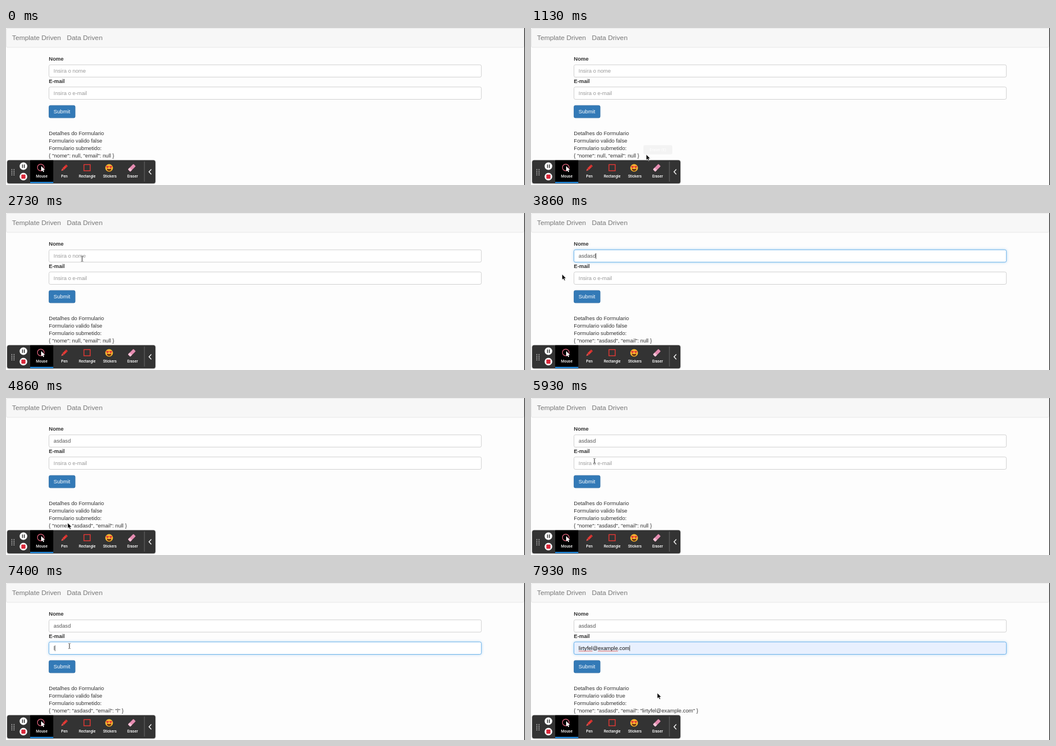
Animation of 900 by 274 pixels, one loop 8000 ms. Source, as an HTML page:

```html
<!DOCTYPE html>
<html lang="pt">
<head>
<meta charset="utf-8">
<title>Formulario</title>
<style>
html, body { margin: 0; width: 100%; height: 100%; overflow: hidden; background: #fdfdfd; }
svg { display: block; width: 100%; height: 100%; }
text { font: 9.21px "Liberation Sans", Arial, sans-serif; fill: #333; white-space: pre; }
.brand { font-size: 11.75px; fill: #777; }
.label { font-weight: bold; }
.field { fill: #fff; stroke: #ccc; stroke-width: .9; }
.tool { font: 500 6.5px Roboto, sans-serif; fill: #fff; text-anchor: middle; }
.caret { stroke: #333; stroke-width: .8; }
</style>
</head>
<body>
<svg viewBox="0 0 900 274">
  <rect width="900" height="274" fill="#fdfdfd"/>
  <rect x=".4" y=".4" width="898" height="33.4" rx="2.6" fill="#f7f7f7" stroke="#e4e4e4" stroke-width=".8"/>
  <rect x="898.8" width="1.2" height="274" fill="#222"/>
  <text class="brand" x="10.5" y="21">Template Driven</text>
  <text class="brand" x="105.4" y="21">Data Driven</text>

  <text class="label" x="74.3" y="57.2">Nome</text>
  <text class="label" x="74.3" y="96">E-mail</text>
  <g id="name">
    <rect class="glow" x="74.5" y="64.2" width="749.8" height="21.6" rx="2.6"/>
    <rect class="field" x="74.5" y="64.2" width="749.8" height="21.6" rx="2.6"/>
    <text x="82.6" y="78.2"></text>
    <path class="caret"/>
  </g>
  <g id="mail">
    <rect class="glow" x="74.5" y="102.9" width="749.8" height="21.6" rx="2.6"/>
    <rect class="field" x="74.5" y="102.9" width="749.8" height="21.6" rx="2.6"/>
    <text x="82.6" y="116.9"></text>
    <path class="caret"/>
  </g>
  <path id="spell" stroke="#e2574c" stroke-width=".9"/>
  <rect x="74.5" y="135.2" width="45.4" height="21.6" rx="2.6" fill="#337ab7" stroke="#2e6da4" stroke-width=".8"/>
  <text x="82.6" y="149.3" style="fill:#fff">Submit</text>

  <text x="74.3" y="186.7">Detalhes do Formulario</text>
  <text id="valid" x="74.3" y="199.8"></text>
  <text x="74.3" y="212.9">Formulario submetido:</text>
  <text id="json" x="74.3" y="226"></text>

  <g id="tip" opacity="0">
    <rect x="195" y="204.5" width="50" height="16" rx="2" fill="#555"/>
    <text class="tool" x="220" y="215">Eraser (E)</text>
  </g>

  <rect x="1" y="230" width="259" height="42.5" rx="4.5" fill="#000" opacity=".18"/>
  <rect x="2" y="230.8" width="257" height="40.4" rx="3.5" fill="#333"/>
  <g id="grip" fill="#ddd"></g>
  <circle cx="30.2" cy="241.2" r="6.6" fill="#fff"/>
  <path d="M28.6 238.2v6M31.8 238.2v6" stroke="#333" stroke-width="1.5"/>
  <circle cx="30.2" cy="259.4" r="6.6" fill="#fff"/>
  <rect x="26.6" y="255.8" width="7.2" height="7.2" rx="1.2" fill="#d9283a"/>

  <rect x="42" y="230.8" width="40" height="40.4" fill="#000"/>
  <rect x="42" y="268.6" width="40" height="2.2" fill="#2b9af3"/>
  <circle cx="60.3" cy="243.4" r="5.8" fill="none" stroke="#e0647c" stroke-width="1.2"/>
  <path d="M61 241v9.2l2.1-1.9 1.5 3.2 1.6-.8-1.5-3h2.9z" fill="#fff"/>

  <g transform="translate(101.3 244) rotate(45)">
    <path d="M-2-6.2h4v9.2h-4z" fill="#e53935"/>
    <path d="M-2 3.6h4l-2 4.2z" fill="#ef5350"/>
    <path d="M-2-4.2h4" stroke="#8e1c1c" stroke-width=".8"/>
  </g>
  <rect x="135.2" y="238.4" width="10.8" height="10.8" fill="none" stroke="#e53935" stroke-width="1.4"/>

  <circle cx="178.8" cy="244.2" r="6.6" fill="#f9b82f"/>
  <path d="M174.8 245.6q4 1.2 8 0q-.5 4-4 4t-4-4z" fill="#6b3212"/>
  <path id="hearts" fill="#e53935"/>

  <g transform="translate(218.2 244) rotate(45)">
    <rect x="-2.9" y="-6.8" width="5.8" height="13.6" rx="1.2" fill="#e58bb0"/>
    <path d="M-2.9 2.4h5.8v3.2q0 1.2-1.2 1.2h-3.4q-1.2 0-1.2-1.2z" fill="#f6c3d7"/>
  </g>
  <g id="tools"></g>
  <path d="M240 233v35" stroke="#777" stroke-width=".8"/>
  <path d="M252 246.6l-4 4.4 4 4.4" fill="none" stroke="#fff" stroke-width="1.4"/>

  <path id="arrow" d="M0 0v9.6l2.2-2 1.6 3.5 1.7-.8-1.6-3.3h3z" fill="#000" stroke="#fff" stroke-width=".6"/>
  <path id="beam" d="M-2-4.6q2 0 2 1.2v6.8q0 1.2-2 1.2M2-4.6q-2 0-2 1.2v6.8q0 1.2 2 1.2" fill="none" stroke="#555" stroke-width=".8"/>
</svg>
<script>
const LOOP = 8000;
const NAME = 'asdasd', MAIL = 'lirtyfel@example.com';
const KEYS = [3130, 3200, 3260, 3460, 3530, 3600];
const FILL = 7530;
// pointer stops: time, x, y
const PATH = [
  [930, 216, 248], [1130, 200, 221], [1460, 172, 172], [1660, 172, 172],
  [2460, 132, 80], [3460, 132, 80], [3860, 54, 107], [4260, 26, 111],
  [4600, 26, 111], [4860, 107, 218], [5130, 107, 218], [5930, 110, 110],
  [7530, 110, 110], [7930, 219, 192]
];

const $ = id => document.getElementById(id);
const clamp = v => Math.max(0, Math.min(1, v));
const ramp = (t, a, b) => clamp((t - a) / (b - a));
const show = (el, on) => el.setAttribute('visibility', on ? 'visible' : 'hidden');

function fieldParts(id) {
  const [glow, box, text, caret] = $(id).children;
  return { glow, box, text, caret };
}
const nameField = fieldParts('name'), mailField = fieldParts('mail');
for (const f of [nameField, mailField]) {
  f.glow.setAttribute('style', 'fill:#66afe9;filter:drop-shadow(0 0 2.4px #66afe9)');
}

$('tools').innerHTML = [['Mouse', 62], ['Pen', 101.2], ['Rectangle', 140.7], ['Stickers', 180], ['Eraser', 219.5]]
  .map(([s, x]) => `<text class="tool" x="${x}" y="261.3">${s}</text>`).join('');
$('grip').innerHTML = Array.from({ length: 8 }, (_, i) =>
  `<circle cx="${10.2 + i % 2 * 3.7}" cy="${247 + (i >> 1) * 3.1}" r=".85"/>`).join('');
$('hearts').setAttribute('d', [176, 181.6].map(x =>
  `M${x} 245l-2.3-2.4q-.5-2 1.2-2 .8 0 1.1.8.3-.8 1.1-.8 1.7 0 1.2 2z`).join(''));

function pointer(t) {
  let i = PATH.findIndex(p => p[0] > t);
  if (i < 0) return PATH[PATH.length - 1].slice(1);
  if (i === 0) return PATH[0].slice(1);
  const [t0, x0, y0] = PATH[i - 1], [t1, x1, y1] = PATH[i];
  const k = (t - t0) / (t1 - t0);
  return [x0 + (x1 - x0) * k, y0 + (y1 - y0) * k];
}

function drawField(f, value, hint, focus, caretOn, filled) {
  f.glow.setAttribute('opacity', focus * .65);
  f.box.style.stroke = focus > .5 ? '#66afe9' : '#ccc';
  f.box.style.fill = filled ? '#e8f0fe' : '#fff';
  f.text.textContent = value || hint;
  f.text.style.fill = filled ? '#111' : value ? '#555' : '#999';
  const x = 83 + (value ? f.text.getComputedTextLength() : 0);
  const y = f.text.getAttribute('y') - 8;
  f.caret.setAttribute('d', `M${x} ${y}v10`);
  show(f.caret, caretOn);
}

function draw(t) {
  const name = NAME.slice(0, KEYS.filter(k => t >= k).length);
  const filled = t >= FILL;
  const mail = filled ? MAIL : t >= 7130 ? MAIL[0] : '';
  const nameFocus = ramp(t, 2790, 2930) * (1 - ramp(t, 4330, 4460));
  const mailFocus = t >= 6800 ? 1 : 0;

  drawField(nameField, name, 'Insira o nome', nameFocus, t >= 2860 && t < 4330, false);
  drawField(mailField, mail, 'Insira o e-mail', mailFocus, mailFocus, filled);

  const at = MAIL.indexOf('@');
  const len = n => 82.6 + mailField.text.getSubStringLength(0, n);
  $('spell').setAttribute('d', filled
    ? `M82.6 118.9H${len(at)}M${len(at + 1)} 118.9H${len(MAIL.indexOf('.'))}` : '');

  const quote = s => s ? `"${s}"` : 'null';
  $('valid').textContent = `Formulario valido ${filled}`;
  $('json').textContent = `{ "nome": ${quote(name)}, "email": ${quote(mail)} }`;

  $('tip').setAttribute('opacity', .85 * ramp(t, 860, 930) * (1 - ramp(t, 1000, 1140)));

  const [x, y] = pointer(t);
  const inField = x > 74 && x < 825 && (y > 64 && y < 86 || y > 103 && y < 125);
  const pos = `translate(${x} ${y})`;
  $('arrow').setAttribute('transform', pos);
  $('beam').setAttribute('transform', pos);
  show($('arrow'), t >= 930 && !inField);
  show($('beam'), t >= 930 && inField);
}

const start = performance.now();
function tick() {
  draw((performance.now() - start) % LOOP);
  requestAnimationFrame(tick);
}
tick();
</script>
</body>
</html>
```
